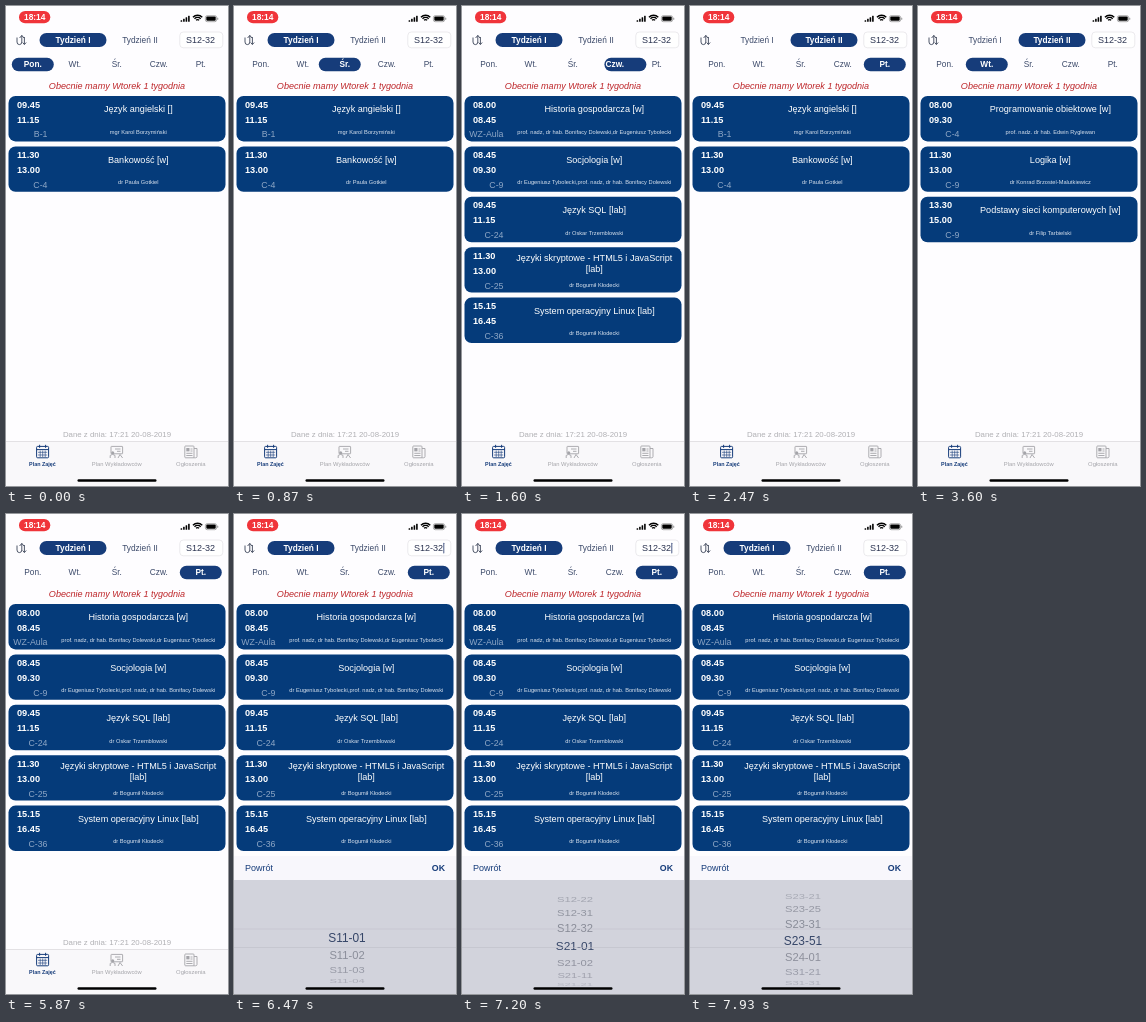
Animation, 222 px wide and 480 px high, one loop 8 s. Source, as an HTML page with a canvas:

```html
<!DOCTYPE html>
<html lang="pl">
<head>
<meta charset="utf-8">
<style>
html, body { margin: 0; width: 100%; height: 100%; overflow: hidden; background: #fff; }
canvas { display: block; width: 222px; height: 480px; }
</style>
</head>
<body>
<canvas id="stage"></canvas>
<script>
const LOOP = 8000;
const NAVY = '#163c7a', CARD = '#053b7a', INK = '#3c4a6a', GRAY = '#a4a4a9';
const canvas = document.getElementById('stage');
const ctx = canvas.getContext('2d');
const ratio = window.devicePixelRatio || 1;
canvas.width = 222 * ratio;
canvas.height = 480 * ratio;

const DAYS = ['Pon.', 'Wt.', 'Śr.', 'Czw.', 'Pt.'];
const WEEKS = ['Tydzień I', 'Tydzień II'];

// Each lesson: start, end, room, title (lines split by |), teacher
const SHORT = [
  ['09.45', '11.15', 'B-1', 'Język angielski []', 'mgr Karol Borzymiński'],
  ['11.30', '13.00', 'C-4', 'Bankowość [w]', 'dr Paula Gotkiel'],
];
const MEDIUM = [
  ['08.00', '09.30', 'C-4', 'Programowanie obiektowe [w]', 'prof. nadz. dr hab. Edwin Ryglewan'],
  ['11.30', '13.00', 'C-9', 'Logika [w]', 'dr Konrad Brzostel-Malutkiewicz'],
  ['13.30', '15.00', 'C-9', 'Podstawy sieci komputerowych [w]', 'dr Filip Tarbielski'],
];
const LONG = [
  ['08.00', '08.45', 'WZ-Aula', 'Historia gospodarcza [w]', 'prof. nadz, dr hab. Bonifacy Dolewski,dr Eugeniusz Tybolecki'],
  ['08.45', '09.30', 'C-9', 'Socjologia [w]', 'dr Eugeniusz Tybolecki,prof. nadz, dr hab. Bonifacy Dolewski'],
  ['09.45', '11.15', 'C-24', 'Język SQL [lab]', 'dr Oskar Trzemblowski'],
  ['11.30', '13.00', 'C-25', 'Języki skryptowe - HTML5 i JavaScript|[lab]', 'dr Bogumił Kłodecki'],
  ['15.15', '16.45', 'C-36', 'System operacyjny Linux [lab]', 'dr Bogumił Kłodecki'],
];

const TAPS = [
  { at: 0, week: 0, day: 0, plan: SHORT },
  { at: 300, week: 0, day: 1, plan: MEDIUM },
  { at: 720, week: 0, day: 2, plan: SHORT },
  { at: 1130, week: 0, day: 3, plan: MEDIUM },
  { at: 1530, week: 0, day: 4, plan: LONG },
  { at: 2000, week: 1, day: 4, plan: SHORT },
  { at: 2750, week: 1, day: 2, plan: SHORT },
  { at: 3350, week: 1, day: 1, plan: MEDIUM },
  { at: 4900, week: 0, day: 1, plan: MEDIUM },
  { at: 5250, week: 0, day: 4, plan: LONG },
];
const PICKER_OPEN = 6050, SPIN_START = 6520;

const GROUPS = Object.entries({
  S11: '01 02 03 04 05 06', S12: '01 02 11 12 21 22 31 32', S21: '01 02 11 21 31 41',
  S22: '01 11 12 21 31 32', S23: '01 11 21 25 31 51', S24: '01', S31: '21 31 41',
}).flatMap(([year, list]) => list.split(' ').map(n => `${year}-${n}`));
const PICKED = GROUPS.indexOf('S23-51');

const clamp = v => Math.max(0, Math.min(1, v));
const easeQuad = p => p < .5 ? 2 * p * p : 1 - 2 * (1 - p) ** 2;
const easeSine = p => (1 - Math.cos(Math.PI * p)) / 2;

function text(str, x, y, size, color, { align = 'center', style = '' } = {}) {
  ctx.font = `${style} ${size}px "Liberation Sans", Arial, sans-serif`;
  ctx.textAlign = align;
  ctx.fillStyle = color;
  ctx.fillText(str, x, y);
}

function box(x, y, w, h, r, fill, stroke, lineWidth = 1) {
  ctx.beginPath();
  ctx.roundRect(x, y, w, h, r);
  if (fill) { ctx.fillStyle = fill; ctx.fill(); }
  if (stroke) { ctx.strokeStyle = stroke; ctx.lineWidth = lineWidth; ctx.stroke(); }
}

function line(d, color, width) {
  ctx.strokeStyle = color;
  ctx.lineWidth = width;
  ctx.stroke(new Path2D(d));
}

function statusBar() {
  box(13, 5, 31.3, 12.3, 6.1, '#f0343a');
  text('18:14', 28.7, 14.3, 8.4, '#fff', { style: 'bold' });
  for (let i = 0; i < 4; i++) box(174.6 + i * 2.5, 14.2 - i * 1.5, 1.6, 1.6 + i * 1.5, .4, '#000');
  for (const r of [2.2, 4.4, 6.6]) {
    ctx.beginPath();
    ctx.arc(191.6, 15.8, r, -Math.PI * .75, -Math.PI * .25);
    ctx.strokeStyle = '#000';
    ctx.lineWidth = 1.4;
    ctx.stroke();
  }
  box(199.4, 9.7, 11.2, 6, 1.8, null, '#777', .6);
  box(200.3, 10.6, 9.4, 4.2, 1, '#000');
  box(211.4, 11.6, .8, 2.2, .4, '#777');
}

// The white bold labels show only through the sliding pill.
function segments(labels, pos, left, width, top, height) {
  const baseline = top + height / 2 + 2.9;
  const center = i => left + width * (i + .5);
  labels.forEach((s, i) => text(s, center(i), baseline, 8.3, INK));
  ctx.save();
  box(left + width * pos, top, width, height, height / 2, NAVY);
  ctx.clip();
  labels.forEach((s, i) => text(s, center(i), baseline, 8.3, '#fff', { style: 'bold' }));
  ctx.restore();
}

function groupField(t) {
  box(173.8, 26, 43, 15.8, 3.5, '#fff', '#e2e1e6', .7);
  text('S12-32', 180, 37.3, 9, '#2a3350', { align: 'left' });
  const blink = t - PICKER_OPEN;
  if (blink >= 0 && blink % 1000 < 500) box(209.3, 28.8, 1, 10.6, .4, '#4a5a86');
}

function lesson([start, end, room, title, teacher], i) {
  const y = 90 + i * 50.4;
  const rows = title.split('|');
  const tall = rows.length > 1;
  box(2.5, y, 217, 45.4, 7, CARD);
  text(start, 11, y + 11.5, 9.2, '#fff', { align: 'left', style: 'bold' });
  text(end, 11, y + 26.6, 9.2, '#fff', { align: 'left', style: 'bold' });
  text(room, 41.5, y + 41.3, 8.8, '#8fa7c6', { align: 'right' });
  rows.forEach((s, k) => text(s, 132.3, y + (tall ? 14.2 : 16.2) + k * 10.6, 9.1, '#fff'));
  text(teacher, 132.3, y + (tall ? 40.2 : 37.8), 5.7, '#dbe4ef');
}

function tabBar() {
  box(0, 435, 222, 45, 0, '#f9f8fa');
  box(0, 435, 222, .6, 0, '#cdccd0');

  box(30.6, 440.4, 12, 11.4, 1, null, NAVY, 1);
  line('M30.6 443.6h12M33.6 438.8v3M39.6 438.8v3', NAVY, 1);
  line('M32 446.3h9.2M32 449h9.2M34.2 444.5v6.5M36.7 444.5v6.5M39.2 444.5v6.5', NAVY, .6);

  box(105, 440.4, 11.6, 7.4, .5, null, GRAY, .9);
  line('M109 443h5.5M111 445.3h3.5M104.2 452v-2.6q2.4 -2 4.8 0v2.6M112 452l2 -3.5l2.6 3.5', GRAY, .9);
  ctx.beginPath();
  ctx.arc(106.7, 446.8, 1.5, 0, 7);
  ctx.fillStyle = GRAY;
  ctx.fill();

  box(178.8, 440, 9.2, 11.8, .8, null, GRAY, .9);
  line('M188 442.5h3v8q0 1.3 -1.5 1.3h-2M184.5 443h2M184.5 445h2M180.3 447.3h6.2M180.3 449.5h6.2', GRAY, .9);
  box(180.3, 442, 3.2, 3.4, 0, GRAY);

  text('Plan Zajęć', 36.4, 460, 5.4, NAVY, { style: 'bold' });
  text('Plan Wykładowców', 110.8, 460, 5.8, GRAY);
  text('Ogłoszenia', 184.8, 460, 5.9, GRAY);
}

function picker(t) {
  if (t < PICKER_OPEN) return;
  const shown = 1 - (1 - clamp((t - PICKER_OPEN) / 300)) ** 3;
  const pos = PICKED * easeSine(clamp((t - SPIN_START) / (LOOP - SPIN_START)));
  const radius = 50.4, step = .344, mid = 424;
  ctx.save();
  ctx.translate(0, (1 - shown) * 138);
  box(0, 342, 222, 24.5, 0, '#f8f7fc');
  text('Powrót', 11, 357.2, 9, NAVY, { align: 'left' });
  text('OK', 211, 357.2, 8.8, NAVY, { align: 'right', style: 'bold' });
  box(0, 366, 222, 114, 0, '#d2d3dc');
  GROUPS.forEach((name, i) => {
    const angle = (i - pos) * step;
    if (Math.abs(angle) > 1.2) return;
    const selected = Math.abs(i - pos) < .5;
    ctx.save();
    ctx.translate(113, mid + radius * Math.sin(angle));
    ctx.scale(1, Math.cos(angle));
    ctx.globalAlpha = selected ? 1 : .7 * Math.cos(angle);
    text(name, 0, 4.1, selected ? 11.9 : 11.2, selected ? '#364668' : '#666a78');
    ctx.restore();
  });
  box(0, 414.8, 222, .5, 0, '#bbbcc6');
  box(0, 433, 222, .5, 0, '#bbbcc6');
  ctx.restore();
}

function draw(t) {
  const index = TAPS.findLastIndex(tap => tap.at <= t);
  const now = TAPS[index], before = TAPS[Math.max(0, index - 1)];
  const p = easeQuad(clamp((t - now.at) / 200));
  const slide = key => before[key] + (now[key] - before[key]) * p;

  ctx.setTransform(ratio, 0, 0, ratio, 0, 0);
  box(0, 0, 222, 480, 0, '#fefdff');
  statusBar();
  line('M11 31.5v4.5q0 2.6 2.4 2.6t2.4 -2.6v-6.5M13.6 32l2.2 -2.6l2.2 2.6M18.4 31v7.4M16.6 36.5l1.8 2l1.8 -2', '#3c4459', .9);
  segments(WEEKS, slide('week'), 33.5, 67, 27, 14);
  segments(DAYS, slide('day'), 5.8, 42, 51.8, 13.4);
  groupField(t);
  text('Obecnie mamy Wtorek 1 tygodnia', 111, 83.2, 9.05, '#bd2529', { style: 'italic' });
  now.plan.forEach(lesson);
  text('Dane z dnia: 17:21 20-08-2019', 111, 431, 7.85, '#b0b0b4');
  tabBar();
  picker(t);
  box(71.5, 473.2, 79, 2.5, 1.2, '#000');
}

const origin = performance.now();
function tick() {
  draw((performance.now() - origin) % LOOP);
  requestAnimationFrame(tick);
}
tick();
</script>
</body>
</html>
```
